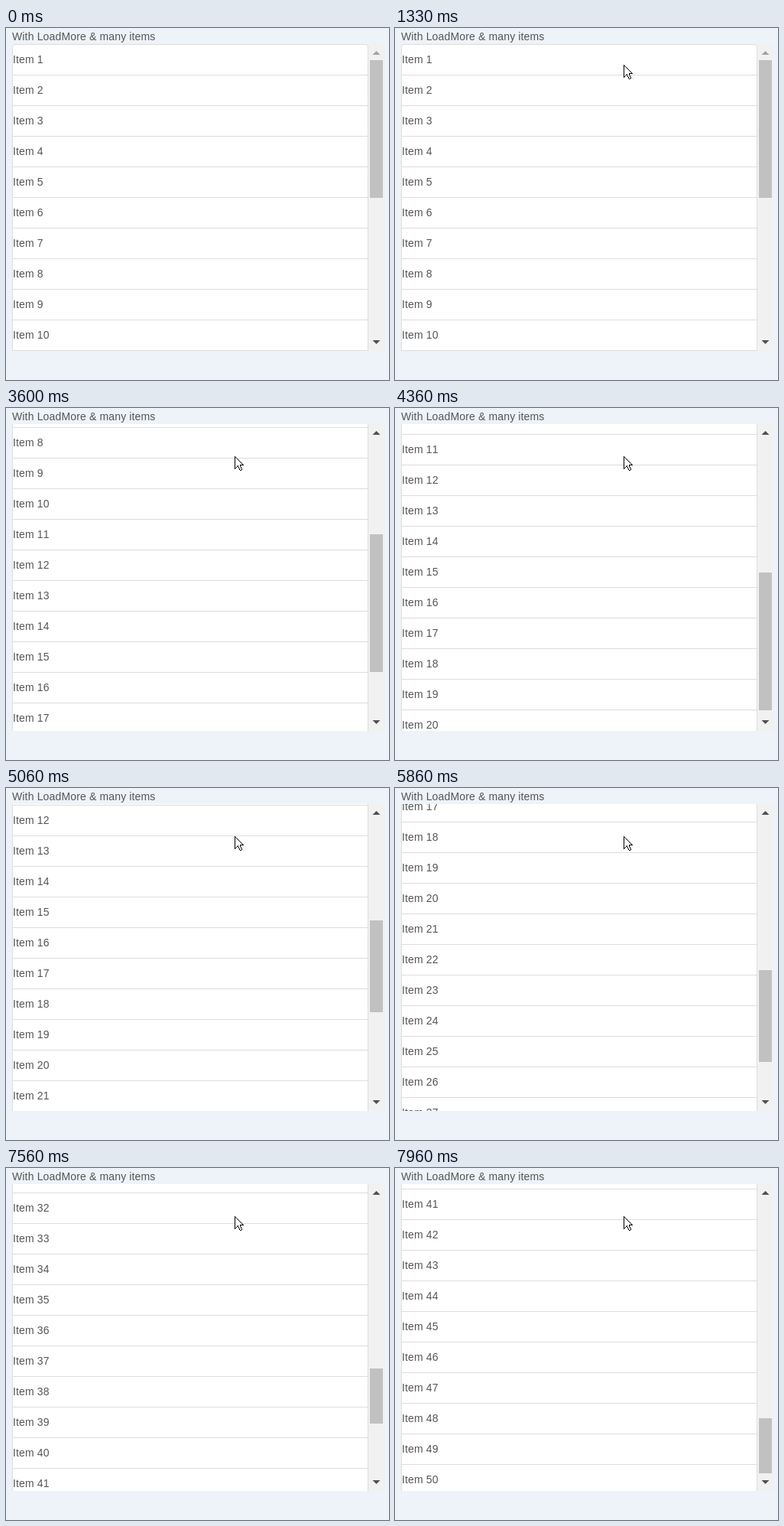
An HTML page that plays this animation: 501x460 px, repeating every 8000 ms.

```html
<!DOCTYPE html>
<html lang="en">
<head>
<meta charset="utf-8">
<title>Load more list</title>
<style>
  html, body { margin: 0; width: 100%; height: 100%; overflow: hidden; background: #edf3f8; }
  svg { display: block; }
  text { font: 14px "Liberation Sans", Arial, sans-serif; font-kerning: none; letter-spacing: .15px; fill: #555; }
</style>
</head>
<body>
<svg width="501" height="460" viewBox="0 0 501 460">
  <defs><clipPath id="view"><rect x="8" y="21" width="466" height="401"/></clipPath></defs>
  <rect width="501" height="460" fill="#edf3f8"/>
  <text x="8" y="16">With LoadMore &amp; many items</text>
  <g clip-path="url(#view)">
    <g id="list">
      <rect id="panel" x="8.5" y="21.5" width="465" rx="3.5" fill="#fff" stroke="#ddd"/>
      <g id="rows"></g>
    </g>
  </g>
  <rect x="474" y="21" width="21" height="401" fill="#f1f1f1"/>
  <rect id="thumb" x="476" width="17" fill="#c1c1c1"/>
  <path id="up" d="M479.5 35L484.5 30L489.5 35z"/>
  <path id="down" d="M479.5 408H489.5L484.5 413z"/>
  <path id="cursor" d="M.5 .5V16.5L4.5 12.5L6.5 17.5L7.5 18.5H8.5L9.5 17.5L7.5 12.5V11.5H11.5z" fill="#fff" stroke="#000" shape-rendering="crispEdges"/>
</svg>
<script>
const LOOP = 8000, STEP = 75, ROW = 40, TOP = 21, VIEW = 401, TRACK = 359;
const $ = id => document.getElementById(id);

// Each glide: first step, last step, value reached
const scrolls = [
  [2350, 2590, 125], [3380, 3810, 375], [4360, 4440, 400], [4980, 5240, 650],
  [5860, 5860, 657], [5940, 6090, 800], [6710, 6860, 930], [6940, 7190, 1200],
  [7560, 7960, 1594]
];
const movesX = [[550, 960, 301], [1330, 1330, 299]];
const movesY = [[550, 960, 48], [1880, 1880, 53], [2030, 2200, 63]];
const loads = [4510, 6160, 7260];

const ease = p => p * p * (3 - 2 * p);

// Value at t, held between the steps of each glide
function glide(keys, t, value) {
  for (const [start, end, to] of keys) {
    if (t < start) break;
    const gaps = Math.round((end - start) / STEP);
    const passed = gaps ? Math.min(gaps, Math.floor((t - start) / (end - start) * gaps)) : 0;
    value += (to - value) * ease((passed + 1) / (gaps + 1));
  }
  return Math.floor(value);
}

function set(id, attrs) {
  for (const key in attrs) $(id).setAttribute(key, attrs[key]);
}

function add(tag, attrs, label = "") {
  const el = document.createElementNS("http://www.w3.org/2000/svg", tag);
  for (const key in attrs) el.setAttribute(key, attrs[key]);
  el.textContent = label;
  return el;
}

const rows = Array.from({ length: 50 }, (_, i) => {
  const y = TOP + i * ROW;
  const row = add("g", {});
  row.append(add("text", { x: 9, y: y + 25 }, `Item ${i + 1}`));
  if (i) row.append(add("rect", { x: 9, y, width: 464, height: 1, fill: "#ddd" }));
  $("rows").append(row);
  return row;
});

function draw(t) {
  const scroll = glide(scrolls, t, 0);
  const count = 20 + 10 * loads.filter(at => t >= at).length;
  const max = count * ROW + 1 - VIEW;
  const size = 3600 / count;
  const arrow = active => ({ fill: active ? "#505050" : "#a3a3a3" });
  set("list", { transform: `translate(0 ${-scroll})` });
  set("panel", { height: count * ROW });
  rows.forEach((row, i) => row.setAttribute("display", i < count ? "inline" : "none"));
  set("thumb", { y: 42 + Math.floor(scroll / max * (TRACK - size)), height: size });
  set("up", arrow(scroll > 0));
  set("down", arrow(scroll < max));
  set("cursor", {
    display: t < movesX[0][0] ? "none" : "inline",
    transform: `translate(${glide(movesX, t, 400)} ${glide(movesY, t, 364)})`
  });
}

function tick() {
  draw(performance.now() % LOOP);
  requestAnimationFrame(tick);
}
tick();
</script>
</body>
</html>
```
